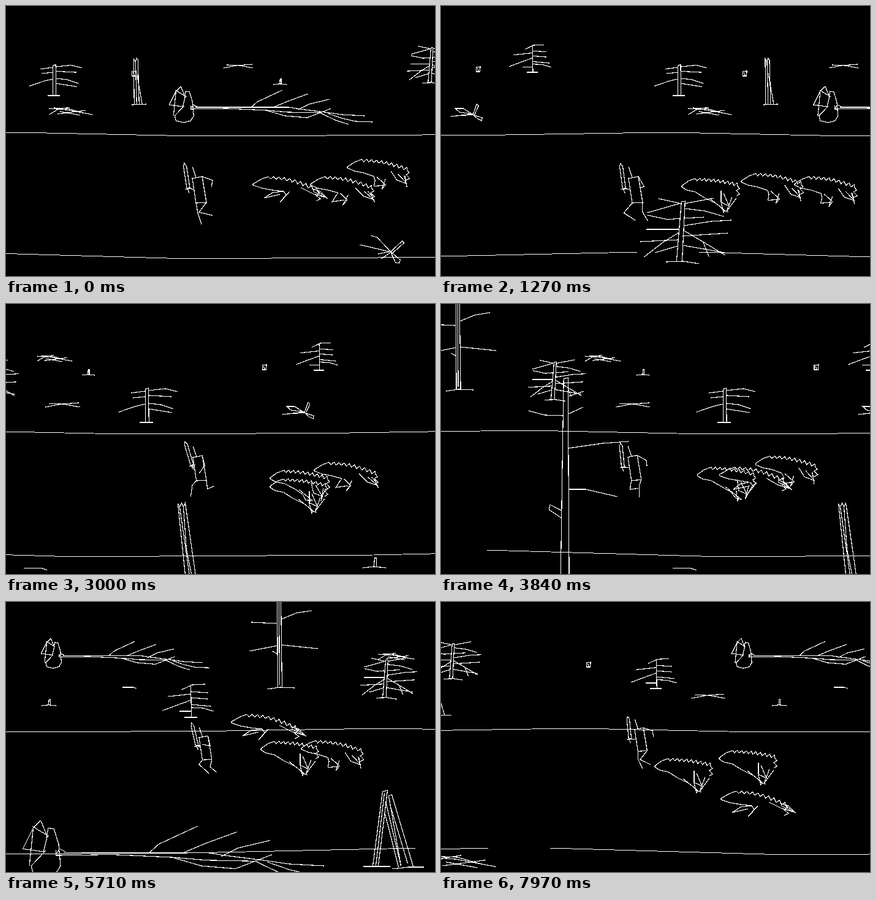
Write an HTML page that moves like this. It is 700 px wide and 440 px high and loops after 8000 ms.

```html
<!DOCTYPE html>
<html lang="en">
<head>
<meta charset="utf-8">
<title>Wolf chase</title>
<style>
html, body { margin: 0; width: 100%; height: 100%; overflow: hidden; background: #000; }
svg { display: block; width: 700px; height: 440px; overflow: hidden; }
path { fill: none; stroke: #fff; stroke-width: 1.2; vector-effect: non-scaling-stroke; shape-rendering: crispEdges; }
.ground { stroke-width: 1; }
</style>
</head>
<body>
<svg id="stage" viewBox="0 0 700 440"></svg>
<script>
const LOOP = 8000;
const stage = document.getElementById('stage');
const TAU = Math.PI * 2;
const mix = (a, b, k) => a + (b - a) * k;

function addPath(d = '', className = '') {
  const path = document.createElementNS('http://www.w3.org/2000/svg', 'path');
  path.setAttribute('d', d);
  path.setAttribute('class', className);
  return stage.appendChild(path);
}

// Piecewise linear value of a track.
function sample(times, values, t) {
  let i = 0;
  while (i < times.length - 2 && t > times[i + 1]) i++;
  return mix(values[i], values[i + 1], (t - times[i]) / (times[i + 1] - times[i]));
}

const TIMES = [0, 1270, 3000, 4640, 5710, 6770, 7970];
const TRAVEL = [0, 40.6, 92.6, 146.3, 175.7, 205.1, 235.6];

// Depth grows linearly down the stage; it sets both size and scroll speed.
const depth = y => y + 284;
const speed = y => depth(y) * 0.01775;

// Each kind of scenery: anchor x, ground y, outline.
const KINDS = {
  pine: [230, 193, `M227 193L227 139L232 137L233 193M218 193L240 193M204 145L227 142M207 153L227 151
    M184 176L210 167L227 163M232 141L260 138L280 143M233 149L270 151M233 162L252 164L273 171M233 171L271 177`],
  snag: [212, 161, `M209 160L208 86L211 91L213 85L215 88L217 160M211 91L213 160M213 110L222 160M205 161L229 160`],
  broken: [300, 470, `M295 470L280 325L283 331L286 324L289 331L292 324L313 470M283 331L303 470M289 331L294 400L308 470`],
  fallen: [290, 190, `M285 131L277 139L266 161L288 164L292 148L285 131M276 137L294 148M277 140L273 179
    M290 163L275 179L277 187L290 190L301 187L306 179L304 156L299 140L293 139L291 149M301 162L301 167L305 161L311 164
    M309 165L461 165L480 168L520 173L548 177L585 179M301 168L360 167L425 170L460 173L512 174
    M400 165L410 156L451 137M436 165L460 155L493 143M476 169L494 160L528 152
    M424 170L455 179L491 182L512 174L530 167M512 174L537 186L559 193M525 175L548 183L570 188L598 189`],
  brush: [105, 180, `M70 179L85 170L104 167M70 169L98 171L141 179M78 168L100 169L125 176M88 174L121 180M84 178L130 172`],
  twigs: [379, 101, `M355 101L376 97L402 95M360 96L381 97L403 101`],
  post: [601, 430, `M582 430L600 428L620 430M600 428L601 414L604 414L604 428`],
  fir: [390, 418, `M384 416L392 319L398 318L393 416M367 417L395 416L421 420M355 314L392 322M336 337L392 321
    M337 341L370 348L390 346M335 364L388 364M325 384L387 381M331 409L362 385L388 369M349 402L386 391
    M397 322L445 313M397 330L430 334L461 343M396 346L429 344M396 358L440 351L474 349M394 375L468 370
    M396 366L430 386L463 406M394 390L463 402M427 384L437 409`],
  uprooted: [628, 420, `M577 389L628 401L605 377L595 374M607 404L628 400L646 383L649 386L630 403
    M612 412L628 401L643 414L641 419L635 418L628 402L631 411`],
  weed: [52, 187, `M16 180L52 176L30 173L23 167L36 167L52 177L58 160L61 163L54 178L67 182L66 187L60 184L52 177L27 179`],
  stub: [60, 107, `M57 100L64 99L63 107L57 107ZM59 101L61 106`],
  larch: [55, 188, `M55 135L56 188M44 188L65 188M40 143L57 135L78 134M18 154L55 150M9 177L30 169L55 160M36 178L55 178
    M55 146L83 148M56 156L82 158M56 167L88 170M56 172L75 173L92 178`],
  mast: [224, 140, `M221 -10L222 140M227 -10L229 139M224 -10L225 135M205 142L225 139L250 140M179 33L220 35M228 28L252 18L277 14
    M176 80L222 71M229 70L287 76M213 80L222 85`],
  trunk: [544, 450, `M536 450L541 122L548 120L550 450M550 150L574 142M541 182L510 181L484 174M549 179L573 168
    M549 235L605 227L647 224M549 302L577 302L629 314M538 349L517 335L519 327L538 337`],
  poles: [250, 431, `M226 430L242 309L250 307L235 430M231 430L245 311M246 345L268 432M247 325L272 430L252 316L257 314L292 431
    M254 330L283 426M211 431L255 431M258 435L284 432L310 432`],
  stick: [200, 140, `M190 139L207 139L213 141`]
};

// Kind, x and ground y at a given travel distance.
const SCENERY = [
  ['pine', 79, 146, 0], ['snag', 212, 161, 0], ['fallen', 290, 190, 0], ['brush', 105, 178, 0],
  ['twigs', 379, 101, 0], ['post', 447, 128, 0], ['fir', 692, 126, 0], ['uprooted', 628, 420, 0],
  ['fir', 390, 418, 40.6], ['weed', 52, 187, 40.6], ['stub', 60, 107, 40.6], ['stub', 495, 114, 40.6],
  ['larch', 149, 108, 40.6], ['pine', 230, 193, 92.6], ['broken', 300, 470, 92.6], ['brush', 79, 94, 92.6],
  ['twigs', 92, 168, 92.6], ['post', 134, 116, 92.6], ['post', 601, 430, 92.6], ['stick', 45, 432, 92.6],
  ['fir', 388, 157, 146.3], ['larch', 55, 188, 146.3], ['mast', 224, 140, 146.3], ['trunk', 544, 450, 146.3],
  ['poles', 249, 431, 146.3], ['fallen', 77, 108, 175.7], ['fallen', 64, 447, 175.7], ['post', 70, 169, 175.7],
  ['stick', 200, 140, 175.7], ['twigs', 197, 157, 205.1], ['larch', 121, 141, 205.1], ['stub', 29, 106, 205.1],
  ['fir', 17, 126, 235.6], ['poles', -22, 184, 235.6], ['brush', 34, 433, 235.6]
].map(([kind, x, y, when]) => {
  const [ax, ay, d] = KINDS[kind];
  const path = addPath(d);
  const scale = depth(y) / depth(ay);
  return travel => {
    const left = x + speed(y) * (travel - when);
    path.setAttribute('transform', `translate(${left.toFixed(2)} ${y}) scale(${scale}) translate(${-ax} ${-ay})`);
  };
});

// Ground lines: one low hill repeated.
const HILL = 'M-800 10L-450 8L-80 0L20 0L370 10L540 10';
function groundLine(peak, y, pace, sx, sy) {
  const period = 1340 * sx;
  const paths = [-1, 0, 1].map(() => addPath(HILL, 'ground'));
  return travel => {
    const x = (peak + pace * (travel - TRAVEL[1]) + period * 4) % period;
    paths.forEach((path, i) =>
      path.setAttribute('transform', `translate(${x + (i - 1) * period} ${y}) scale(${sx} ${sy})`));
  };
}
const grounds = [groundLine(385, 206.5, 8.77, 0.694, 0.5), groundLine(400, 401, 12.5, 1, 1)];

const line = points => 'M' + points.map(([x, y]) => `${x.toFixed(1)} ${y.toFixed(1)}`).join('L');
function chain(x, y, ...steps) {
  const points = [[x, y]];
  for (let i = 0; i < steps.length; i += 2) points.push([x += steps[i], y += steps[i + 1]]);
  return line(points);
}

// Run cycle: phase, thigh, shin, upper arm, forearm.
const STRIDE = [
  [0, -7, 7, -3, 20, 4, 17, -10, 14],
  [0.2, 3, 16, 6, 19, 17, 6, -2, 11],
  [0.35, -4, 13, 12, 13, 17, 4, 8, 11],
  [0.5, 2, 15, 11, -5, 17, 6, 4, 12],
  [0.7, -12, 16, 22, 5, 12, 14, -4, 6],
  [0.8, -14, 16, 18, 14, 9, 17, -8, 1],
  [0.87, -6, 8, 18, 16, 4, 18, -14, -3],
  [1, -7, 7, -3, 20, 4, 17, -10, 14]
];
const STRIDE_TIMES = STRIDE.map(row => row[0]);
const stride = (phase, from) => [0, 1, 2, 3].map(i =>
  sample(STRIDE_TIMES, STRIDE.map(row => row[from + i]), ((phase % 1) + 1) % 1));

const RUNNER = {
  x: [304, 306, 305, 305, 315, 310, 316],
  y: [280, 280, 249, 248, 220, 279, 207],
  phase: [0.2, 2.78, 6, 9.05, 10.87, 13.25, 15.25]
};
const body = addPath();
const sword = addPath('M-2 0L-3 -36L-1 -41L2 -36L3 0ZM-5 1L6 1M-1 1L1 8');

function drawRunner(t) {
  const [x, y, phase] = [RUNNER.x, RUNNER.y, RUNNER.phase].map(track => sample(TIMES, track, t));
  const reach = Math.max(0, Math.cos(TAU * phase));
  const hand = [-9 + 7 * reach, 18 - 4 * reach];
  const place = `translate(${x} ${y}) scale(${(y + 359) / 638})`;
  body.setAttribute('d', 'M0 1L16 -2L23 40L6 41ZM0 -18L6 -1' +
    line([[3, 19], hand]) +
    chain(16, -2, ...stride(phase, 5)) +
    chain(6, 41, ...stride(phase, 1)) +
    chain(23, 40, ...stride(phase + 0.5, 1)));
  body.setAttribute('transform', place);
  sword.setAttribute('transform', `${place} translate(${hand}) rotate(${-4 - 11 * reach})`);
}

// Wolf strokes as x, y pairs: stretched pose, then gathered pose.
const WOLF = [
  [[0, 2, 15, 7, 32, 10, 50, 12], [0, 2, 8, 7, 22, 10, 36, 19, 46, 20, 58, 30].slice(0, 8)],
  [[50, 12, 32, 14, 18, 23, 44, 17], [36, 19, 58, 30, 68, 40, 76, 43]],
  [[50, 12, 54, 18, 44, 30, 60, 12], [46, 21, 70, 40, 68, 44, 64, 28]],
  [[78, 6, 98, 16, 118, 22, 98, 12], [64, 8, 64, 27, 77, 33, 68, 12]],
  [[96, 8, 110, 12, 122, 24, 106, 12], [89, 20, 80, 32, 73, 42, 82, 18]]
];

function wolfOutline(gather) {
  const at = (a, b) => mix(a, b, gather);
  const back = [[0, 2], [0, 0], [at(14, 11), -8], [at(25, 22), -12]];
  const teeth = 9;
  for (let i = 1; i <= teeth; i++) {
    const k = i / teeth;
    const x = mix(at(25, 22), at(104, 90), k);
    const y = mix(-11, at(8, -3), k) - at(5, 2) * Math.sin(Math.PI * k);
    back.push([x - 5, y + 2.5], [x, y - 1.5]);
  }
  const [x, y] = back[back.length - 1];
  back.push([x + 1, y + 5], [x + 4, y + 9], [x - 1, y + 12], [x + at(6, 4), y + 18], [x - 1, y + 21]);
  const strokes = WOLF.map(([stretched, gathered]) => {
    const p = stretched.map((v, i) => at(v, gathered[i]));
    return line([0, 2, 4, 6].map(i => [p[i], p[i + 1]]));
  });
  return line(back) + strokes.join('');
}

const wolves = [
  { x: [403, 393, 431, 406, 368, 358, 349], y: [290, 293, 297, 260, 195, 262, 267],
    phase: [0, 2.5, 6.5, 10.2, 12, 14.2, 16.5] },
  { x: [497, 490, 431, 477, 416, 432, 457], y: [290, 285, 283, 273, 239, 260, 320],
    phase: [0.2, 2.25, 6.35, 9.75, 11.5, 14, 17] },
  { x: [557, 577, 503, 523, 482, 457, 454], y: [262, 290, 270, 250, 238, 214, 254],
    phase: [0.25, 2.75, 6.2, 9.2, 11.25, 13.5, 15.5] }
].map(track => {
  const path = addPath();
  return t => {
    const [x, y, phase] = [track.x, track.y, track.phase].map(values => sample(TIMES, values, t));
    path.setAttribute('d', wolfOutline((1 - Math.cos(TAU * phase)) / 2));
    path.setAttribute('transform', `translate(${x} ${y})`);
  };
});

const start = performance.now();
function draw() {
  const t = (performance.now() - start) % LOOP;
  const travel = sample(TIMES, TRAVEL, t);
  SCENERY.forEach(move => move(travel));
  grounds.forEach(move => move(travel));
  drawRunner(t);
  wolves.forEach(move => move(t));
  requestAnimationFrame(draw);
}
draw();
</script>
</body>
</html>
```
